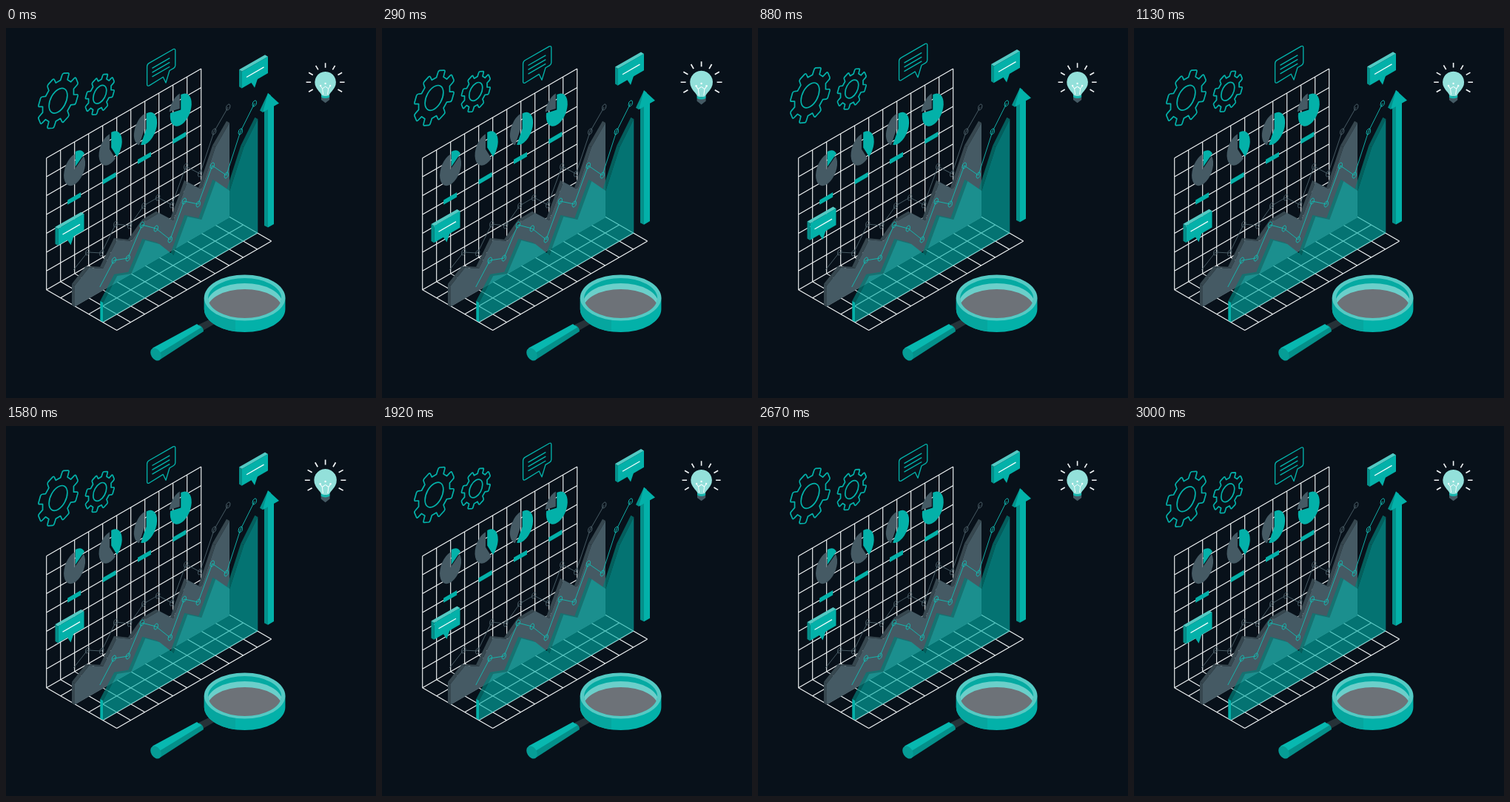
An HTML page for the animation above (3040 ms loop, 500 px wide and 500 px high).

```html
<!DOCTYPE html>
<html lang="en">
<head>
<meta charset="utf-8">
<title>Isometric analytics</title>
<style>
  html, body { margin: 0; width: 100%; height: 100%; overflow: hidden; background: #08111a; }
  svg { display: block; width: 100vw; height: 100vh; }
</style>
</head>
<body>
<svg id="stage" viewBox="0 0 500 500" fill="none" stroke-linejoin="round"></svg>
<script>
const LOOP = 3040;
const TEAL = '#03b1a9', DEEP = '#04908a', PALE = '#55cac4';
const GRAY = '#455a64', DARK = '#37474f', BLACK = '#263238', WHITE = '#f4ffff';
const SLOPE = 0.577, STEP = 19;
const stage = document.getElementById('stage');

function add(parent, tag, attrs) {
  const el = document.createElementNS('http://www.w3.org/2000/svg', tag);
  for (const key in attrs) el.setAttribute(key, attrs[key]);
  parent.appendChild(el);
  return el;
}
const group = (attrs = {}, parent = stage) => add(parent, 'g', attrs);
const path = (parent, d, attrs) => add(parent, 'path', { d, ...attrs });
const poly = (parent, points, fill) => add(parent, 'polygon', { points, fill });
const ellipse = (parent, cx, cy, rx, ry, fill) => add(parent, 'ellipse', { cx, cy, rx, ry, fill });
const range = (n, f) => Array.from({ length: n }, (_, i) => f(i));

// Maps a unit circle onto the wall plane
const onWall = (x, y, rx, ry) => `matrix(${rx} ${-rx * SLOPE} 0 ${ry} ${x} ${y})`;

function polar(deg, r = 1) {
  const a = deg * Math.PI / 180;
  return [r * Math.sin(a), -r * Math.cos(a)].map(v => v.toFixed(3)).join(' ');
}

// Upright face that follows the wall direction
function wallFace(parent, x, y, w, h, fill) {
  path(parent, `M${x} ${y}l${w} ${-w * SLOPE}v${h}l${-w} ${w * SLOPE}Z`, { fill });
}

function grids() {
  const x = 54.7, y = 353.8, row = 25.45, cols = 11, rows = 7, depth = 5;
  const along = `l${cols * STEP} ${-cols * STEP * SLOPE}`;
  const down = `v${rows * row}l${depth * STEP} ${depth * STEP * SLOPE}`;
  let d = '';
  for (let i = 0; i <= cols; i++) d += `M${x + i * STEP} ${y - i * STEP * SLOPE - rows * row}${down}`;
  for (let j = 0; j <= rows; j++) d += `M${x} ${y - j * row}${along}`;
  for (let k = 1; k <= depth; k++) d += `M${x + k * STEP} ${y + k * STEP * SLOPE}${along}`;
  path(stage, d, { stroke: '#eef2f3', 'stroke-width': 1.15 });
}

function wedge(x, y, from, to, fill, gap) {
  const arc = `A1 1 0 ${to - from > 180 ? 1 : 0} 1 ${polar(to)}`;
  path(stage, `M0 0L${polar(from)}${arc}Z`, {
    fill, transform: `${onWall(x, y, 14.5, 20.5)} translate(${polar((from + to) / 2, gap)})`
  });
}

// Pies with a growing share, each above its label bar
function pies() {
  [58, 147, 211, 281].forEach((share, i) => {
    const dx = 47.4 * i, dy = -dx * SLOPE;
    wedge(92.6 + dx, 191 + dy, share, 360, GRAY, 0);
    wedge(92.6 + dx, 191 + dy, 0, share, TEAL, 0.16);
    wallFace(stage, 83.2 + dx, 232.5 + dy, 18, 6.3, TEAL);
  });
}

function trend(x, ys, color) {
  const pts = ys.map((y, i) => [x + i * STEP, y]);
  path(stage, 'M' + pts.join('L'), { stroke: color, 'stroke-width': 0.9 });
  for (const [px, py] of pts.slice(1)) {
    add(stage, 'circle', {
      r: 1, transform: onWall(px, py, 2.7, 3.7), stroke: color,
      'stroke-width': 1, 'vector-effect': 'non-scaling-stroke'
    });
  }
}

// Slab with the profile of a trend line, standing on the floor
function slab(x, ys, base, face, side, end) {
  const w = 4, h = w * SLOPE;
  const pts = ys.map((y, i) => [x + i * STEP, y + 21]);
  pts.slice(1).forEach(([bx, by], i) => {
    const [ax, ay] = pts[i];
    if ((by - ay) / STEP < SLOPE) {
      poly(stage, `${ax},${ay} ${ax - w},${ay - h} ${bx - w},${by - h} ${bx},${by}`, side);
    }
  });
  path(stage, `M${x} ${pts[0][1]}l${-w} ${-h}V${base - h}l${w} ${h}Z`, { fill: end });
  const run = (ys.length - 1) * STEP;
  poly(stage, [...pts, [x + run, base - run * SLOPE], [x, base]].join(' '), face);
}

function charts() {
  const back = [327, 303, 304, 265, 267, 240, 229, 239, 187, 197, 140, 107];
  const front = [350, 314, 311, 266, 271, 286, 234, 238, 186, 199, 140, 102];
  trend(91.2, back, '#4f626b');
  slab(93, back, 376.5, GRAY, DARK, DARK);
  slab(131.3, front, 397.5, 'rgba(3,177,169,.62)', 'rgba(3,125,119,.72)', TEAL);
  trend(126.8, front, '#12bdb4');
}

function gear(parent, x, y, rx, ry) {
  const teeth = range(8, k => {
    const a = 22.5 + 45 * k;
    return `${polar(a - 14, 0.77)}L${polar(a - 11, 0.94)}Q${polar(a - 10.5, 1)} ${polar(a - 7, 1)}` +
      `L${polar(a + 7, 1)}Q${polar(a + 10.5, 1)} ${polar(a + 11, 0.94)}L${polar(a + 14, 0.77)}`;
  });
  const style = {
    transform: onWall(x, y, rx, ry), stroke: TEAL,
    'stroke-width': 1.7, 'vector-effect': 'non-scaling-stroke'
  };
  path(parent, 'M' + teeth.join('L') + 'Z', style);
  add(parent, 'circle', { r: 0.45, ...style });
}

function bubble(parent, x, y) {
  const g = group({ transform: `translate(${x} ${y})` }, parent);
  path(g, 'M0 0l4 2.5v23l-4 -2.5Z', { fill: DEEP });
  path(g, 'M0 0l35 -20l4 2.5l-35 20Z', { fill: PALE });
  wallFace(g, 4, 2.5, 35, 22.5, TEAL);
  path(g, 'M16 17L21 24.5L25.5 11Z', { fill: TEAL });
  path(g, 'M10 10.3l23.5 -13.6', { stroke: WHITE, 'stroke-width': 1.3 });
}

function outlineBubble(parent) {
  const lines = range(3, i => `M197.5 ${54.3 + 5.8 * i}l23.8 -13.7`).join('');
  path(parent, 'M193.5 47.3L226 28.7Q228.8 27.4 228.8 30.5V50.5Q228.8 53 226.5 54.3L221 57.5L216 74' +
    'L212.3 66.2L193.5 77.8Q190.6 79 190.6 76.2V52Q190.6 49 193.5 47.3Z' + lines,
    { stroke: TEAL, 'stroke-width': 1.35 });
}

function arrow(parent) {
  path(parent, 'M349 106l5 3v160.5l-5 -2.5Z', { fill: DEEP });
  wallFace(parent, 354, 108, 8, 161.5, TEAL);
  path(parent, 'M354 88L343 111.5L347 114L358 91Z', { fill: DEEP });
  path(parent, 'M354 88L369 101.7L347 114Z', { fill: TEAL });
}

function floaters() {
  const g = group();
  gear(g, 70.5, 98.2, 27.5, 34);
  gear(g, 126.8, 89.7, 20, 25);
  outlineBubble(g);
  bubble(g, 315, 56.2);
  bubble(g, 66.5, 268.7);
  arrow(g);
  return g;
}

function magnifier() {
  path(stage, 'M260 401L283 390Q287 394 285 398L266 409Z', { fill: BLACK });
  path(stage, 'M202 437L261 401.5Q267 404 267 410L206 449.5Z', { fill: DEEP });
  path(stage, 'M198 432.5L258 400L264 404.5L206 440Z', { fill: '#08b8b0' });
  ellipse(stage, 202.5, 441, 6.4, 9.2, '#069d96').setAttribute('transform', 'rotate(-32 202.5 441)');

  const cx = 322.6, cy = 364.5, rx = 54.8, ry = 31;
  path(stage, `M${cx - rx} ${cy}v15.5a${rx} ${ry} 0 0 0 ${2 * rx} 0v-15.5Z`, { fill: TEAL });
  path(stage, `M${cx - rx} ${cy}v15.5A${rx} ${ry} 0 0 0 310 410.2V${cy}Z`, { fill: '#06a69f' });
  ellipse(stage, cx, cy, rx, ry, PALE);
  ellipse(add(stage, 'clipPath', { id: 'lens' }), cx, cy + 0.5, 49.5, 27);
  const glass = group({ 'clip-path': 'url(#lens)' });
  ['#05aaa2', '#6bcfca', '#6d7278'].forEach((fill, i) => ellipse(glass, cx, cy + 8 * i, 51, 27.5, fill));
}

function bulb() {
  const g = group(), cx = 431.6;
  const rays = range(9, i => `M${polar(30 * i - 120, 19.5)}L${polar(30 * i - 120, 26)}`).join('');
  path(g, rays, { stroke: '#f2f6f7', 'stroke-width': 1.6, transform: `translate(${cx} 73.3)` });
  path(g, 'M426 93.5H437.2V97L431.6 101.3L426 97Z', { fill: GRAY });
  path(g, 'M426.5 92C426.5 88 422 86 419 80A14.3 14.3 0 1 1 444.2 80C441 86 436.7 88 436.7 92Z', { fill: '#93e0da' });
  path(g, 'M426 90.5Q431.6 93.5 437.2 90.5V93.5Q431.6 96.5 426 93.5Z', { fill: '#16b5ad' });
  for (const side of [-1, 1]) {
    path(g, `M${cx + 3 * side} 90l${side} -8l2.5 -3.5m-2.5 3.5l${-4 * side} -3`.replace('l2.5', `l${2.5 * side}`)
      .replace('m-2.5', `m${-2.5 * side}`), { stroke: WHITE, 'stroke-width': 1 });
    ellipse(g, cx + 6.5 * side, 78, 1.2, 1.2, WHITE);
  }
  ellipse(g, cx, 75, 1.2, 1.2, WHITE);
  return g;
}

grids();
pies();
charts();
const floating = floaters();
magnifier();
const lamp = bulb();

// Steady rise and fall, twice per loop
function lift(t) {
  const p = ((t + 40) % 1520) / 760;
  return 0.55 - 9.9 * (p < 1 ? p : 2 - p);
}

// Two heartbeats, then rest
function beat(t) {
  const s = t < 1080 ? t - 40 : t - 1080;
  if (t > 1930 || s < 0 || s > 850) return 0;
  return s < 330 ? s / 330 : (850 - s) / 520;
}

function draw(now) {
  const t = now % LOOP, scale = 1 + 0.1 * beat(t);
  floating.setAttribute('transform', `translate(0 ${lift(t).toFixed(3)})`);
  lamp.setAttribute('transform', `translate(431.6 74) scale(${scale.toFixed(4)}) translate(-431.6 -74)`);
}

const begin = performance.now();
function tick() {
  draw(performance.now() - begin);
  requestAnimationFrame(tick);
}
tick();
</script>
</body>
</html>
```
